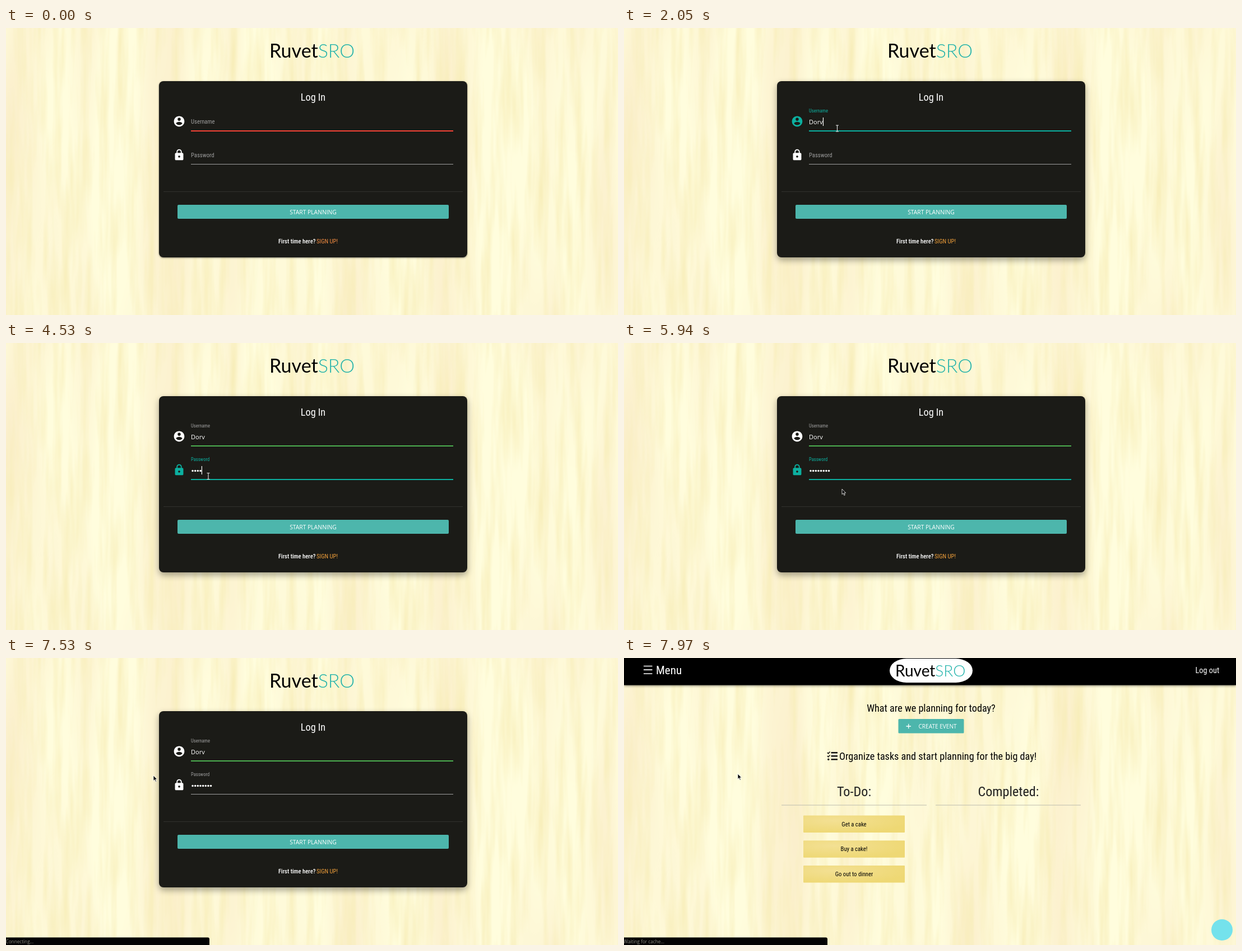
These frames come from a looping animation (1092x513 px, 8 s). An HTML page:

```html
<!DOCTYPE html>
<html lang="en">
<head>
<meta charset="utf-8">
<title>Event planner login</title>
<style>
  html, body { margin: 0; width: 100%; height: 100%; overflow: hidden; background: #fffddd; }
  svg { position: absolute; left: 0; top: 0; width: 1092px; height: 513px; }
  #wood { will-change: transform; }
  #stage { --tight: 0; }
  .rc { font-family: "Roboto Condensed", Roboto, sans-serif; font-stretch: condensed; letter-spacing: var(--tight); }
  .os { font-family: "Open Sans", "Noto Sans", sans-serif; }
  .la { font-family: Lato, sans-serif; }
  .thin { font-weight: 300; fill: #20b2aa; }
  .mid { text-anchor: middle; }
  .white { fill: #fff; }
</style>
</head>
<body>
<svg id="wood" viewBox="0 0 1092 513">
  <filter id="broad" x="0" y="0" width="1" height="1" color-interpolation-filters="sRGB">
    <feTurbulence type="fractalNoise" baseFrequency=".012 .0018" numOctaves="2" seed="4"/>
    <feColorMatrix values="0 0 0 0 .98  0 0 0 0 .92  0 0 0 0 .78  1.8 0 0 0 -.65"/>
  </filter>
  <filter id="fine" x="0" y="0" width="1" height="1" color-interpolation-filters="sRGB">
    <feTurbulence type="fractalNoise" baseFrequency=".06 .005" numOctaves="3" seed="9"/>
    <feColorMatrix values="0 0 0 0 .97  0 0 0 0 .93  0 0 0 0 .72  1.8 0 0 0 -.72"/>
  </filter>
  <rect width="1092" height="513" fill="#fffddd"/>
  <rect width="1092" height="513" filter="url(#broad)"/>
  <rect width="1092" height="513" filter="url(#fine)"/>
</svg>

<svg id="stage" viewBox="0 0 1092 513">
  <defs>
    <clipPath id="btnClip"><rect x="306" y="316" width="484" height="25" rx="2"/></clipPath>
    <radialGradient id="note" cx=".3" cy=".3" r=".75">
      <stop stop-color="#f3e093"/><stop offset="1" stop-color="#eed874"/>
    </radialGradient>
  </defs>

  <g id="login">
    <text class="la" x="470" y="53" font-size="34">Ruvet<tspan class="thin">SRO</tspan></text>
    <rect id="card" x="273" y="95" width="550" height="315" rx="8" fill="#1b1b17"/>
    <text id="heading" class="rc mid white" x="548" y="129.500" font-size="18.2">Log In</text>

    <path id="userIcon" transform="translate(297.8 155.700) scale(.933)" d="M12 2C6.48 2 2 6.48 2 12s4.48 10 10 10 10-4.480 10-10S17.520 2 12 2zm0 3c1.660 0 3 1.340 3 3s-1.340 3-3 3-3-1.340-3-3 1.340-3 3-3zm0 14.200c-2.500 0-4.710-1.280-6-3.220.030-1.990 4-3.080 6-3.080 1.990 0 5.970 1.090 6 3.080-1.290 1.940-3.500 3.220-6 3.220z"/>
    <text id="userLabel" class="rc" font-size="10.7">Username</text>
    <text id="userText" class="os white" x="330" y="172" font-size="11"></text>
    <rect id="userLine" x="330" width="468"/>

    <path id="passIcon" transform="translate(297.8 215.800) scale(.933)" d="M18 8h-1V6c0-2.760-2.240-5-5-5S7 3.240 7 6v2H6c-1.100 0-2 .9-2 2v10c0 1.100.9 2 2 2h12c1.100 0 2-.9 2-2V10c0-1.100-.9-2-2-2zm-6 9c-1.100 0-2-.9-2-2s.9-2 2-2 2 .9 2 2-.9 2-2 2zm3.100-9H8.900V6c0-1.710 1.390-3.100 3.100-3.100 1.710 0 3.100 1.390 3.100 3.100v2z"/>
    <text id="passLabel" class="rc" font-size="10.7">Password</text>
    <g id="dots" class="white"></g>
    <rect id="passLine" x="330" width="468"/>
    <rect id="caret" class="white" width="1.200" height="15"/>

    <rect x="281" y="292" width="534" height="1" fill="#32322e"/>
    <rect x="306" y="316" width="484" height="25" rx="2" fill="#4db6ac"/>
    <g clip-path="url(#btnClip)"><circle id="ripple" class="white" cx="413" cy="324"/></g>
    <text class="os mid white" x="548" y="332.500" font-size="10.3">START PLANNING</text>
    <text class="rc white" x="486" y="384.500" font-size="10.7" font-weight="500">First time here?</text>
    <text id="signUp" class="rc" x="554" y="384.500" font-size="10.7">SIGN UP!</text>

    <g id="menu" class="os" font-size="9" font-weight="600" fill="#222">
      <rect id="menuBox" class="white" x="330" y="184" width="138" rx="3"/>
      <text x="339" y="206">Dorv</text>
      <text id="mail" x="339" y="232">dvorel38@example.com</text>
    </g>
  </g>

  <g id="home">
    <rect width="1092" height="48.500" style="filter: drop-shadow(0 1px 2px #0008)"/>
    <path d="M35 14.500h15.500M35 21.200h15.500M35 28h15.500" stroke="#fff" stroke-width="1.700"/>
    <text class="rc white" x="57" y="28.500" font-size="21">Menu</text>
    <rect class="white" x="474" y="1" width="148" height="43" rx="30" ry="21.500"/>
    <text class="la" x="484" y="32.500" font-size="28">Ruvet<tspan class="thin">SRO</tspan></text>
    <text class="rc white" x="1019.500" y="26.500" font-size="14.300">Log out</text>

    <text class="rc mid" x="548" y="96" font-size="18.200">What are we planning for today?</text>
    <rect x="489.500" y="109" width="117" height="25.500" rx="1.500" fill="#4db6ac"/>
    <path d="M503.500 122h8.500M507.750 117.750v8.500" stroke="#fff" stroke-width="1.300"/>
    <text class="os white" x="525.500" y="126" font-size="10.100">CREATE EVENT</text>

    <path d="M369.500 169.300h11.500M369.500 175.300h11.500M369.500 181.200h11.500" stroke="#111" stroke-width="2.400"/>
    <path d="M362.800 169l1.700 1.800 3-3.400M362.800 175l1.700 1.800 3-3.400" fill="none" stroke="#111" stroke-width="1.500"/>
    <circle cx="364.800" cy="181.200" r="1.700" fill="#111"/>
    <text class="rc" x="384" y="182" font-size="18.200">Organize tasks and start planning for the big day!</text>

    <text class="rc mid" x="410.500" y="247" font-size="24.200" fill="#222">To-Do:</text>
    <text class="rc mid" x="686" y="247" font-size="24.200" fill="#222">Completed:</text>
    <path d="M281 263h259M556 263h259" stroke="#bcbcae"/>
    <g id="notes"></g>
    <circle id="badge" cx="1067" cy="486" r="19" fill="#74e2ec"/>
  </g>

  <g id="status">
    <path d="M0 499.500h360q3 0 3 3V513H0z" fill="#030303"/>
    <text id="statusText" class="os" x="-.5" y="510" font-size="8.200" fill="#8b8b80"></text>
  </g>

  <g id="pointer">
    <circle id="press" r="8.800" fill="#fff000" opacity=".55"/>
    <path id="beam" d="M-2.500-5.500h2l.5.500.500-.500h2M-2.500 5.500h2l.5-.500.500.500h2M0-5v10" fill="none" stroke="#e8e8e8" stroke-width="1.100"/>
    <path id="arrow" d="M0 0v9.500l2.200-2 1.700 3.800 1.500-.700-1.700-3.600h3z" stroke="#fff" stroke-width=".8"/>
    <path id="hand" d="M-1 0a1 1 0 0 1 2 0v4l5 1.200v3.300l-1.300 2.500h-4.700l-3.300-4.500 1-1 1.300 1.200z" fill="#fff" stroke="#111" stroke-width=".9"/>
  </g>
</svg>

<script>
const LOOP = 8000, NAME = "Dorv", TEAL = "#0cb0a0", GRAY = "#9e9e9e";
const el = {};
document.querySelectorAll("#stage [id]").forEach(e => el[e.id] = e);

// Tighten the spacing when no condensed face is available.
if (el.heading.getComputedTextLength() > 47)
  document.getElementById("stage").style.setProperty("--tight", "-.055em");

el.dots.innerHTML = Array.from({ length: 8 }, (_, i) =>
  `<circle cx="${333 + 4.65 * i}" cy="228.500" r="1.750"/>`).join("");
el.notes.innerHTML = ["Get a cake", "Buy a cake!", "Go out to dinner"].map((s, i) => {
  const y = 281.5 + 44.700 * i;
  return `<rect x="320" y="${y}" width="181" height="30.500" rx="1" fill="url(#note)"/>
    <text class="rc mid" x="410.500" y="${y + 19}" font-size="10.7">${s}</text>`;
}).join("");

const nameKeys = [1660, 1810, 1960, 2050];
const passKeys = [3700, 3910, 4070, 4530, 4770, 5010, 5160, 5400];
const path = [
  [130, 838, 330], [560, 610, 262], [720, 610, 262], [1150, 380.5, 179.5],
  [2590, 380.5, 179.5], [2920, 361, 238], [5939, 361, 238], [5940, 389, 261],
  [6330, 413, 313], [6480, 413, 313], [6630, 413, 324], [7060, 413, 324],
  [7530, 263, 210], [7670, 248, 210], [7970, 203, 207]
];

const ramp = (t, a, b) => Math.min(1, Math.max(0, (t - a) / (b - a)));
const smooth = k => k * k * (3 - 2 * k);
const mix = (a, b, k) => `color-mix(in srgb, ${b} ${k * 100}%, ${a})`;
const within = (t, a, b) => t >= a && t < b;
const show = (e, on) => e.style.display = on ? "" : "none";
const typed = (keys, t) => keys.filter(k => k <= t).length;
const set = (e, attrs) => { for (const k in attrs) e.setAttribute(k, attrs[k]); };

function pointerAt(t) {
  const i = path.findIndex(p => p[0] > t);
  if (i < 0) return path[path.length - 1].slice(1);
  if (i === 0) return path[0].slice(1);
  const [a, x0, y0] = path[i - 1], [b, x1, y1] = path[i];
  const k = smooth(ramp(t, a, b));
  return [x0 + (x1 - x0) * k, y0 + (y1 - y0) * k];
}

// up: label lifted, on: field focused
function drawField(id, y, up, on, idle, idleHeight) {
  const label = el[id + "Label"], line = el[id + "Line"];
  set(label, { transform: `translate(330 ${y + 4 - 20.4 * up}) scale(${1 - 0.2 * up})` });
  label.style.fill = mix(GRAY, TEAL, on);
  el[id + "Icon"].style.fill = mix("#fff", TEAL, on);
  line.style.fill = mix(idle, TEAL, on);
  set(line, { y: y + 16, height: idleHeight + (2 - idleHeight) * on });
}

function drawLogin(t) {
  const hover = ramp(t, 130, 430);
  el.card.style.filter =
    `drop-shadow(0 ${1 + 4 * hover}px ${1.5 + 4.5 * hover}px rgba(0,0,0,${0.45 - 0.1 * hover}))`;
  el.signUp.style.fill = t < 720 ? "#f58d42" : "#f2a03a";

  const toUser = ramp(t, 1220, 1360), toPass = ramp(t, 3300, 3440), blur = ramp(t, 6850, 6990);
  drawField("user", 167, toUser, toUser - toPass, t < 3300 ? "#f44336" : "#4caf50", 2);
  drawField("pass", 227, toPass, toPass - blur, GRAY, 1);

  const letters = typed(nameKeys, t), count = typed(passKeys, t);
  el.userText.textContent = NAME.slice(0, letters);
  [...el.dots.children].forEach((d, i) => show(d, i < count));

  const inPass = t >= 3300;
  const blink = within(t, 2590, 2850) || within(t, 3150, 3300);
  show(el.caret, within(t, 1220, 5940) && !blink);
  set(el.caret, inPass
    ? { x: 330.2 + 4.65 * count, y: 220 }
    : { x: 330.2 + (letters ? el.userText.getComputedTextLength() : 0), y: 160 });

  const both = t < 1890;
  show(el.menu, within(t, 1230, 2050));
  show(el.mail, both);
  set(el.menuBox, { height: both ? 63 : 37 });

  const k = ramp(t, 6830, 7580);
  set(el.ripple, { r: 480 * (1 - (1 - k) ** 2.2), opacity: 0.17 * (1 - ramp(t, 7060, 7450)) });
}

function drawPointer(t) {
  const [x, y] = pointerAt(t), login = t < 7670;
  const over = (x0, y0, x1, y1) => login && x > x0 && x < x1 && y > y0 && y < y1;
  const hand = over(306, 316, 790, 341);
  const beam = over(330, 152, 798, 184) || over(330, 212, 798, 244);
  show(el.pointer, t >= 130);
  set(el.pointer, { transform: `translate(${x} ${y})` });
  show(el.hand, hand);
  show(el.beam, beam);
  show(el.arrow, !hand && !beam);
  show(el.press, within(t, 1200, 1340) || within(t, 3300, 3380) || within(t, 6800, 7020));
}

function draw(t) {
  const home = t >= 7670;
  show(el.login, !home);
  show(el.home, home);
  show(el.badge, t >= 7830);
  show(el.status, t >= 7300);
  el.statusText.textContent = home ? "Waiting for cache..." : "Connecting...";
  if (!home) drawLogin(t);
  drawPointer(t);
}

const start = performance.now();
(function frame() {
  draw((performance.now() - start) % LOOP);
  requestAnimationFrame(frame);
})();
</script>
</body>
</html>
```
